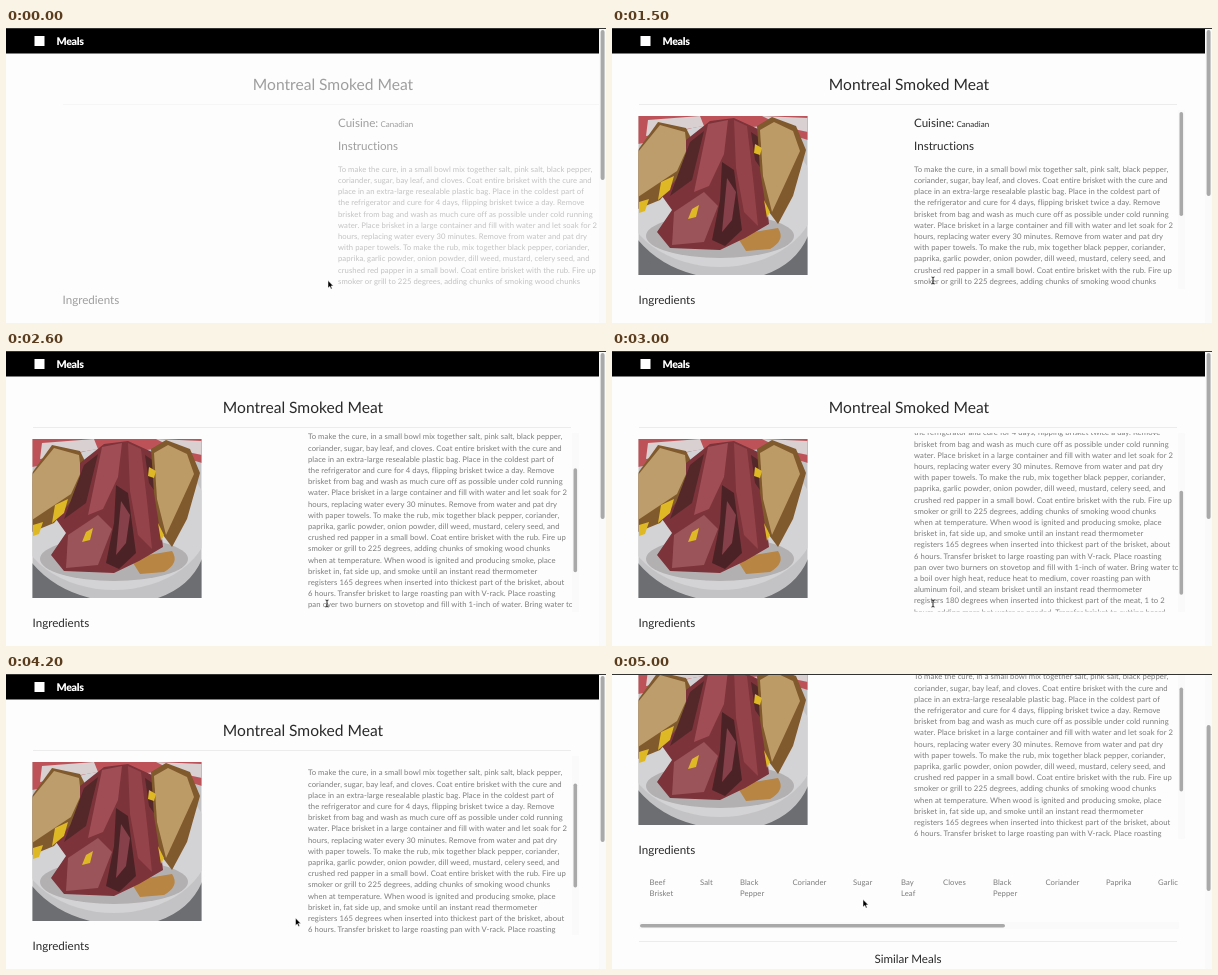
Animation of 600 by 295 pixels, one loop 5100 ms. Source, as an HTML page:

```html
<!DOCTYPE html>
<html lang="en">
<head>
<meta charset="utf-8">
<title>Meals</title>
<style>
  html, body { margin: 0; width: 100%; height: 100%; overflow: hidden; background: #fdfdfd; }
  svg { display: block; width: 600px; height: 295px; font-family: Lato, sans-serif; font-variant-ligatures: none; text-rendering: geometricPrecision; fill: #2a2a2a; }
  .title { font-size: 15.6px; text-anchor: middle; }
  .head { font-size: 11.6px; }
  .body { font-size: 7.7px; letter-spacing: .065px; fill: #7c7c7c; }
  .thumb { fill: #a9a9a9; }
  .rule { fill: #ececec; }
  .track { fill: #fafafa; }
</style>
</head>
<body>
<svg viewBox="0 0 600 295">
  <defs>
    <clipPath id="panelClip"><rect x="300" y="82" width="266" height="178.5"/></clipPath>
    <clipPath id="photoClip"><rect x="26.5" y="88" width="169" height="159"/></clipPath>
    <clipPath id="listClip"><rect x="26" y="290" width="540" height="50"/></clipPath>
  </defs>

  <g id="page">
    <rect width="593" height="25.5" fill="#000"/>
    <rect x="28.5" y="8" width="10" height="10" fill="#fff"/>
    <text x="50.5" y="17.3" font-size="10.6" font-weight="900" letter-spacing="-.3" fill="#fff">Meals</text>

    <g id="content">
      <text class="title" x="297" y="61.5">Montreal Smoked Meat</text>
      <rect class="rule" x="27" y="76" width="538" height="1"/>

      <g id="photo" clip-path="url(#photoClip)">
        <rect x="26" y="88" width="170" height="160" fill="#c3c2c4"/>
        <path d="M26 88H196V112L150 98L90 104L26 116Z" fill="#bd5358"/>
        <path d="M36 92L88 88L92 98L34 108ZM150 88L196 90V104L172 99Z" fill="#d8d0d1"/>
        <ellipse cx="108" cy="168" rx="96" ry="71" fill="#d3d2d4"/>
        <path d="M26 212Q48 238 84 247H26ZM196 208Q184 236 152 247H196Z" fill="#6c6e72"/>
        <ellipse cx="108" cy="208" rx="74" ry="22" fill="#b3b0b2"/>
        <path d="M124 207L166 200Q174 212 158 221L134 223Z" fill="#b98542"/>
        <path d="M26 122L46 94L74 100L82 116L76 140L48 172L26 181Z" fill="#80592c"/>
        <path d="M26 124L48 97L73 104L75 121L65 143L26 169Z" fill="#bd9d6c"/>
        <path d="M74 112L98 93L122 90L146 101L151 145L157 196L133 210L108 222L58 220L45 204L60 182L50 168L74 140Z" fill="#7c333a"/>
        <path d="M96 96L116 92L112 126L97 158L82 164Z" fill="#a04d56"/>
        <path d="M122 92L135 98L141 150L146 198L132 184L124 140Z" fill="#95434b"/>
        <path d="M62 184L92 164L106 178L92 214L60 217Z" fill="#9b555a"/>
        <path d="M110 134L122 142L130 202L113 218L100 212L108 172Z" fill="#4b2326"/>
        <path d="M78 114L92 103L80 152L58 168ZM139 104L148 110L150 142L143 132Z" fill="#542729"/>
        <path d="M115 150L124 164L120 192L110 204Z" fill="#86404a"/>
        <path d="M145 98L160 89L184 98L194 122L181 168L166 196L154 180L148 142Z" fill="#80592c"/>
        <path d="M148 102L162 94L181 103L188 123L172 158L160 184L151 148Z" fill="#bd9b67"/>
        <path d="M49 154L62 148L58 162L46 172ZM27 174L37 171L33 183L27 185ZM80 181L87 177L84 189L76 191ZM143 116L150 120L148 127L142 125ZM152 172L158 184L155 190Z" fill="#dfb925"/>
      </g>

      <g clip-path="url(#panelClip)">
        <g id="panel">
          <text class="head" x="302" y="98.5">Cuisine:</text>
          <text x="344.5" y="98.5" font-size="8">Canadian</text>
          <text class="head" x="302" y="122.3">Instructions</text>
          <g id="steps" class="body"></g>
        </g>
      </g>
      <rect class="track" x="566" y="82" width="7" height="179"/>
      <rect id="panelThumb" class="thumb" x="567.5" y="84" width="3.6" height="104" rx="1.8"/>

      <text class="head" x="26.5" y="276.3">Ingredients</text>
      <g id="items" class="body" clip-path="url(#listClip)"></g>
      <rect class="track" x="27" y="344" width="540" height="7"/>
      <rect class="thumb" x="28" y="346" width="365" height="3.6" rx="1.8"/>
      <rect class="rule" x="27" y="363" width="538" height="1"/>
      <text class="head" x="296" y="385.3" text-anchor="middle">Similar Meals</text>
    </g>
  </g>

  <rect x="593" width="7" height="295" fill="#fafafa"/>
  <rect id="pageThumb" class="thumb" x="594.6" y="2" width="4" rx="2"/>
  <rect width="600" height="1" fill="#333"/>

  <g id="cursor">
    <path id="arrow" d="M0 0V7.5L1.8 5.9L3 8.6L4.2 8.1L3 5.4H5.3Z" fill="#000" stroke="#fff" stroke-width=".5"/>
    <path id="beam" d="M-1.5 -3.5Q0 -3.5 0 -2.5V2.5Q0 3.5 -1.5 3.5M1.5 -3.5Q0 -3.5 0 -2.5M0 2.5Q0 3.5 1.5 3.5" fill="none" stroke="#111" stroke-width=".9"/>
  </g>
</svg>
<script>
const LOOP = 5100, STEP = 100;
const $ = id => document.getElementById(id);

const steps = `To make the cure, in a small bowl mix together salt, pink salt, black pepper,
coriander, sugar, bay leaf, and cloves. Coat entire brisket with the cure and
place in an extra-large resealable plastic bag. Place in the coldest part of
the refrigerator and cure for 4 days, flipping brisket twice a day. Remove
brisket from bag and wash as much cure off as possible under cold running
water. Place brisket in a large container and fill with water and let soak for 2
hours, replacing water every 30 minutes. Remove from water and pat dry
with paper towels. To make the rub, mix together black pepper, coriander,
paprika, garlic powder, onion powder, dill weed, mustard, celery seed, and
crushed red papper in a small bowl. Coat entire brisket with the rub. Fire up
smoker or grill to 225 degrees, adding chunks of smoking wood chunks
when at temperature. When wood is ignited and producing smoke, place
brisket in, fat side up, and smoke until an instant read thermometer
registers 165 degrees when inserted into thickest part of the brisket, about
6 hours. Transfer brisket to large roasting pan with V-rack. Place roasting
pan over two burners on stovetop and fill with 1-inch of water. Bring water to
a boil over high heat, reduce heat to medium, cover roasting pan with
aluminum foil, and steam brisket until an instant read thermometer
registers 180 degrees when inserted into thickest part of the meat, 1 to 2
hours, adding more hot water as needed. Transfer brisket to cutting board
and let cool slightly. Slice across the grain and serve with rye bread
and mustard.`.split('\n');

const items = [
  [37.5, 'Beef Brisket'], [88, 'Salt'], [128, 'Black Pepper'], [180.5, 'Coriander'],
  [241, 'Sugar'], [289, 'Bay Leaf'], [331, 'Cloves'], [381, 'Black Pepper'],
  [433.5, 'Coriander'], [494, 'Paprika'], [546, 'Garlic']
];

function addLines(parent, x, y, lines) {
  lines.forEach((line, i) => {
    const text = document.createElementNS('http://www.w3.org/2000/svg', 'text');
    text.setAttribute('x', x);
    text.setAttribute('y', y + i * 11.2);
    text.textContent = line;
    parent.append(text);
  });
}
addLines($('steps'), 302, 143.8, steps);
items.forEach(([x, name]) => addLines($('items'), x, 307.2, name.split(' ')));

// Linear interpolation through [time, value] points, held at both ends.
function track(t, points) {
  if (t <= points[0][0]) return points[0][1];
  for (let i = 1; i < points.length; i++) {
    const [t0, v0] = points[i - 1], [t1, v1] = points[i];
    if (t <= t1) return v0 + (v1 - v0) * (t - t0) / (t1 - t0);
  }
  return points[points.length - 1][1];
}

const move = (id, x, y) => $(id).setAttribute('transform', `translate(${x} ${y})`);
const show = (id, on) => $(id).setAttribute('visibility', on ? 'visible' : 'hidden');

function draw(t) {
  const enter = Math.min(1, t / 400);
  move('content', 30 * (1 - enter) ** 2, 0);
  $('content').setAttribute('opacity', .45 + .55 * enter);
  show('photo', t >= 100);

  const panelY = track(t, [[2000, 0], [2200, 12], [2500, 46], [3000, 93], [3300, 112], [3500, 112], [3900, 60], [4100, 42.5]]);
  move('panel', 0, -panelY);
  move('panelThumb', 0, panelY * .6);

  const pageY = track(t, [[4300, 0], [4500, 32], [4800, 86], [5000, 96]]);
  move('page', 0, -pageY);
  move('pageThumb', 0, pageY * .51);
  $('pageThumb').setAttribute('height', t < 200 ? 150 : 166);

  const x = track(t, [[500, 322], [1300, 321], [3700, 321], [4200, 289.5], [4500, 289.5], [5000, 251]]);
  const y = track(t, [[3700, 252.5], [4200, 244], [4500, 244], [5000, 225.5]]);
  const overText = t >= 200 && x > 302;
  move('cursor', x, y);
  show('beam', overText);
  show('arrow', !overText);
}

const start = performance.now();
function frame() {
  const t = (performance.now() - start) % LOOP;
  draw(Math.floor(t / STEP) * STEP);
  requestAnimationFrame(frame);
}
frame();
</script>
</body>
</html>
```
